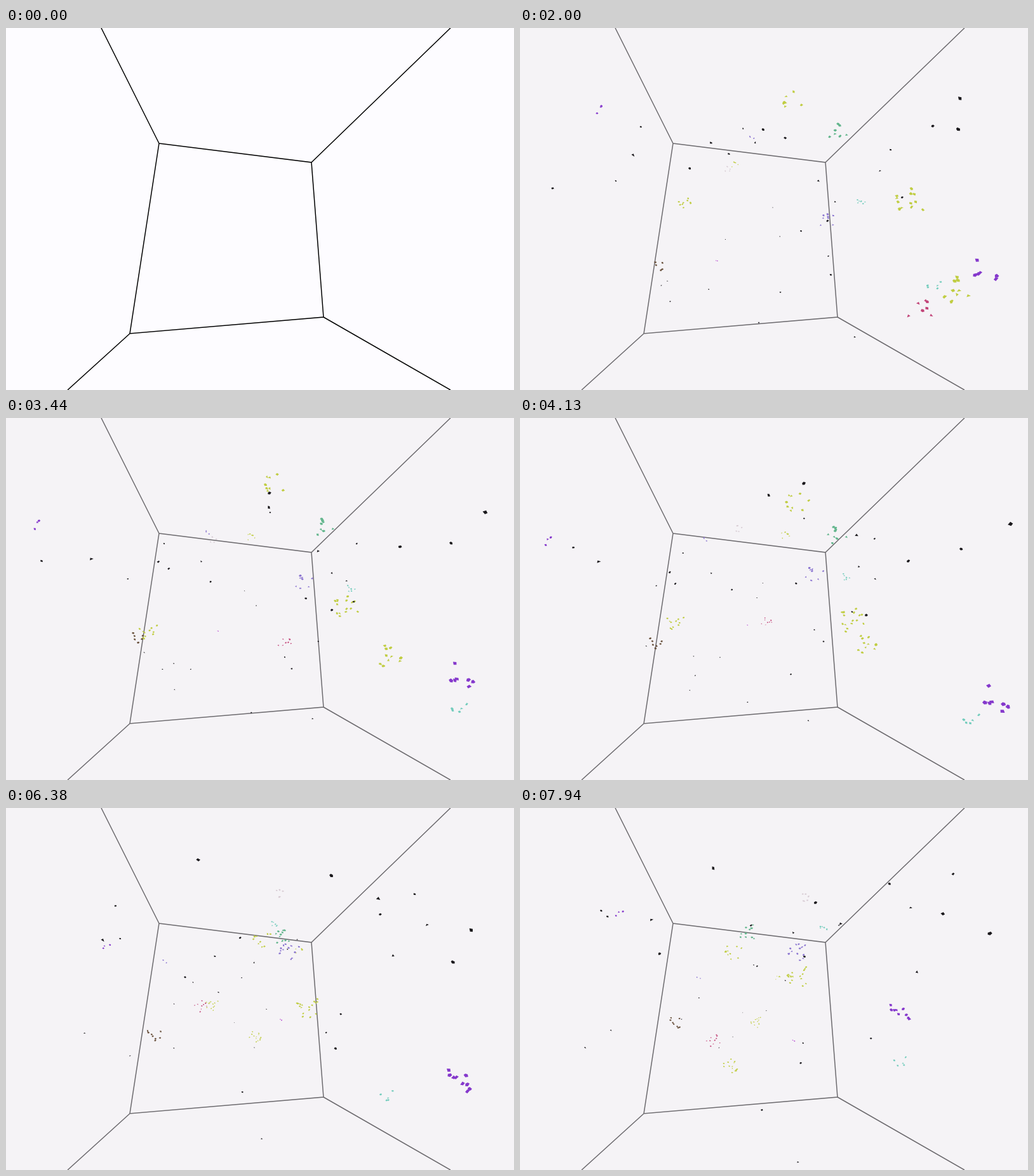
Write an HTML page with a canvas that moves like this. It is 800 px wide and 571 px high and loops after 8 s.

```html
<!DOCTYPE html>
<html lang="en">
<head>
<meta charset="utf-8">
<title>Flocks in a room</title>
<style>
html, body { margin: 0; width: 100%; height: 100%; overflow: hidden; background: #f5f3f6; }
canvas { display: block; width: 800px; height: 571px; }
</style>
</head>
<body>
<canvas id="stage" width="800" height="571"></canvas>
<script>
const ctx = document.getElementById('stage').getContext('2d');
const LOOP = 8000, STEP = 62.5, STEPS = LOOP / STEP;
const CENTER = { x: 355, y: 330 };

const LIME = '#c0cd42', BLACK = '#1a181c', BROWN = '#68503c', PINK = '#d8ccd4', MAGENTA = '#c24478',
  ORCHID = '#b445d0', PURPLE = '#8538cc', VIOLET = '#8a74d0', TEAL = '#72ccbc', GREEN = '#62b58c';

let seed = 11;
const random = () => (seed = (seed * 16807) % 2147483647) / 2147483647;
const between = (low, high) => low + (high - low) * random();
const bell = (middle, deviation) => middle + deviation * 2 * (random() + random() + random() - 1.5);
const times = (count, make) => Array.from({ length: count }, make);

function makeBird() {
  const sides = 3 + Math.floor(random() * 3);
  return {
    angle: between(0, 2 * Math.PI),
    reach: Math.sqrt(random()),
    corners: times(sides, (_, i) => (i + between(0, 0.4)) / sides * 2 * Math.PI)
      .map(a => [Math.cos(a), Math.sin(a) * 0.75])
  };
}

// A smooth curve through evenly timed points; progress runs from 0 to 1.
function curve(points) {
  const last = points.length - 1;
  return progress => {
    const i = Math.min(last - 1, Math.floor(progress * last));
    const u = progress * last - i;
    const b = points[i], c = points[i + 1], a = points[i - 1] || b, d = points[i + 2] || c;
    const [x, y] = b.map((p, k) => p + u / 2 * (c[k] - a[k] +
      u * (2 * a[k] - 5 * p + 4 * c[k] - d[k] + u * (3 * (p - c[k]) + d[k] - a[k]))));
    return { x, y };
  };
}

// A gentle drift around a home somewhere in the room.
function wander() {
  const homeX = bell(405, 135), homeY = bell(285, 105);
  const phase = between(0, 2 * Math.PI), pace = between(4, 8);
  return progress => ({
    x: homeX + 65 * Math.sin(progress * pace + phase),
    y: homeY + 50 * Math.cos(progress * pace * 0.8 + phase * 2)
  });
}

const flock = (color, count, path, nearness = 0.9, gathering = 0) =>
  ({ color, path, nearness, gathering, birds: times(count, makeBird) });
const leading = (color, count, ...points) => flock(color, count, curve(points), 0.9, 0.5);

const flocks = [
  leading(LIME, 20, [790, 265], [565, 285], [505, 337], [440, 265]),
  leading(LIME, 11, [475, 230], [420, 90], [441, 183], [335, 227]),
  leading(LIME, 14, [425, 60], [228, 325], [290, 297], [375, 338]),
  leading(LIME, 14, [740, 460], [658, 397], [452, 340], [332, 408]),
  leading(MAGENTA, 11, [1000, 600], [520, 397], [330, 293], [305, 368]),
  leading(PURPLE, 9, [870, 420], [706, 380], [784, 474], [600, 316]),
  leading(VIOLET, 13, [510, 390], [477, 280], [455, 232], [440, 229]),
  leading(GREEN, 12, [500, 178], [503, 163], [486, 200], [361, 198]),
  leading(BROWN, 8, [270, 480], [205, 352], [225, 368], [245, 340]),
  ...[LIME, TEAL, PURPLE, VIOLET, ORCHID, PINK, TEAL].map(color =>
    flock(color, Math.floor(between(3, 7)), wander(), 0.6)),
  ...times(33, () => flock(BLACK, 1, wander(), between(0.5, 1.1)))
];

function drawBird({ corners, angle }, x, y, size, step) {
  ctx.save();
  ctx.translate(x, y);
  ctx.rotate(0.6 * Math.sin(step * 0.09 + angle));
  ctx.scale(size, size);
  ctx.beginPath();
  corners.forEach(corner => ctx.lineTo(...corner));
  ctx.fill();
  ctx.restore();
}

// Birds look larger, and flocks wider, the farther they are from the back wall.
function drawFlock({ color, path, nearness, gathering, birds }, step) {
  const progress = step / STEPS;
  const { x, y } = path(progress);
  const size = nearness * (1 + Math.hypot(x - CENTER.x, y - CENTER.y) / 110);
  const present = Math.ceil(birds.length * (1 - gathering * (1 - progress)));
  const radius = present > 1 ? 2.6 * size * Math.sqrt(present) : 0;
  ctx.fillStyle = color;
  birds.slice(0, present).forEach(bird => {
    const a = bird.angle + 0.35 * Math.sin(step * 0.05 + bird.angle * 3);
    const away = bird.reach * radius;
    drawBird(bird, x + Math.cos(a) * away, y + Math.sin(a) * away * 0.85, size, step);
  });
}

function drawRoom(color) {
  const inner = [[241, 182], [481, 212], [500, 456], [195, 482]];
  const outer = [[150, 0], [700, 0], [700, 571], [97, 571]];
  ctx.strokeStyle = color;
  ctx.lineWidth = 1.5;
  ctx.beginPath();
  inner.forEach(p => ctx.lineTo(...p));
  ctx.closePath();
  inner.forEach((p, i) => { ctx.moveTo(...p); ctx.lineTo(...outer[i]); });
  ctx.stroke();
}

function draw(time) {
  const step = Math.floor((time % LOOP + 3) / STEP);
  const empty = step < 1;
  ctx.fillStyle = empty ? '#fdfcff' : '#f5f3f6';
  ctx.fillRect(0, 0, 800, 571);
  drawRoom(empty ? '#000' : '#6c6a6e');
  if (!empty) flocks.forEach(f => drawFlock(f, step));
}

const start = performance.now();
function tick() {
  draw(performance.now() - start);
  requestAnimationFrame(tick);
}
tick();
</script>
</body>
</html>
```
